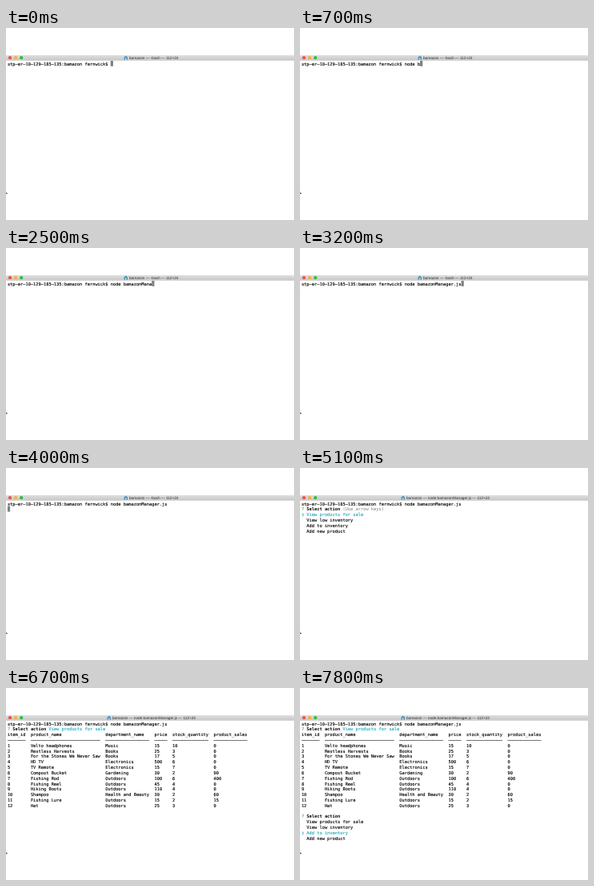
These frames come from a looping animation (360 by 240 pixels, 8000 ms). An HTML page with a canvas:

```html
<!DOCTYPE html>
<html lang="en">
<head>
<meta charset="utf-8">
<title>Terminal session</title>
<style>
html, body { margin: 0; width: 100%; height: 100%; overflow: hidden; background: #fff; }
canvas { display: block; }
</style>
</head>
<body>
<canvas id="stage" width="360" height="240"></canvas>
<script>
const ctx = document.getElementById('stage').getContext('2d');
ctx.textRendering = 'geometricPrecision';

const LOOP = 8000;
const LEFT = 1.9, TOP = 41, CELL = 3.22, ROW = 6.815, BASELINE = 5.55;
const MONO = '5.35px "DejaVu Sans Mono", monospace';
const BLACK = '#000', CYAN = '#1fa9bd', GREEN = '#2fae3a', GREY = '#999';

const PROMPT = 'stp-er-10-129-185-135:bamazon fernwick$ ';
const COMMAND = 'node bamazonManager.js ';
// One press time per character of the command
const KEYS = [100, 200, 300, 500, 700, 700, 900, 1100, 1300, 1500, 1600, 1700,
  2000, 2300, 2400, 2500, 2700, 2800, 2900, 3000, 3100, 3200, 3300];
const ENTER = 4000, RENAME = 4100, MENU = 4400, CHOOSE = 5700, TABLE = 5800;
const ERASE = 6700, DOWN1 = 6800, DOWN2 = 7100;

const ACTIONS = ['View products for sale', 'View low inventory', 'Add to inventory', 'Add new product'];
const COLUMNS = [0, 9, 38, 57, 64, 80];
const WIDTHS = [7, 27, 17, 5, 14, 13];
const PRODUCTS = `item_id|product_name|department_name|price|stock_quantity|product_sales
${WIDTHS.map(n => '-'.repeat(n)).join('|')}
1|Velto headphones|Music|15|10|0
2|Restless Harvests|Books|25|3|0
3|For the Stones We Never Saw|Books|17|5|0
4|HD TV|Electronics|500|6|0
5|TV Remote|Electronics|15|7|0
6|Compost Bucket|Gardening|30|2|90
7|Fishing Rod|Outdoors|100|6|400
8|Fishing Reel|Outdoors|45|4|0
9|Hiking Boots|Outdoors|110|4|0
10|Shampoo|Health and Beauty|30|2|60
11|Fishing Lure|Outdoors|15|2|15
12|Hat|Outdoors|25|3|0`.split('\n').map(line => line.split('|'));

// Writes text on the character grid; a hair stroke adds weight, hyphens are wide
function print(row, col, text, color = BLACK, bold = false) {
  ctx.font = (bold ? 'bold ' : '') + MONO;
  ctx.fillStyle = ctx.strokeStyle = color;
  ctx.lineWidth = 0.12;
  const y = TOP + row * ROW + BASELINE;
  [...text.replaceAll('-', '–')].forEach((ch, i) => {
    if (ch === ' ') return;
    const x = LEFT + (col + i) * CELL;
    ctx.fillText(ch, x, y);
    if (!bold) ctx.strokeText(ch, x, y);
  });
}

function cursor(row, col) {
  ctx.fillStyle = '#808080';
  ctx.fillRect(LEFT + col * CELL, TOP + row * ROW, CELL, ROW);
}

function titleBar(text, x) {
  const shade = ctx.createLinearGradient(0, 34, 0, 41);
  shade.addColorStop(0, '#dedede');
  shade.addColorStop(1, '#c6c6c6');
  ctx.fillStyle = shade;
  ctx.beginPath();
  ctx.roundRect(0, 34, 360, 6.8, [1.5, 1.5, 0, 0]);
  ctx.fill();

  ['#f2504b', '#f6b03a', '#2fbd43'].forEach((color, i) => {
    ctx.fillStyle = color;
    ctx.beginPath();
    ctx.arc(5 + i * 7.1, 37.2, 2.1, 0, 7);
    ctx.fill();
  });

  // Home folder icon
  ctx.fillStyle = '#4795c0';
  ctx.beginPath();
  [[-7, 37.2], [-4.2, 34.6], [-1.4, 37.2], [-2, 37.2], [-2, 39.8], [-6.4, 39.8], [-6.4, 37.2]]
    .forEach(([dx, y]) => ctx.lineTo(x + dx, y));
  ctx.fill();
  ctx.fillStyle = '#e8eef2';
  ctx.fillRect(x - 4.8, 37.4, 1.2, 2.4);

  ctx.font = '4.74px "Liberation Sans", Arial, sans-serif';
  ctx.fillStyle = '#2a2a2a';
  ctx.fillText(text, x, 39.1);
}

function question(row, note, color) {
  print(row, 0, '?', GREEN);
  print(row, 2, 'Select action', BLACK, true);
  print(row, 16, note, color);
}

function menu(row, selected, hint) {
  question(row, hint ? '(Use arrow keys)' : '', GREY);
  ACTIONS.forEach((action, i) => {
    const on = i === selected;
    if (on) print(row + 1 + i, 0, '❯', CYAN);
    print(row + 1 + i, 2, action, on ? CYAN : BLACK);
  });
}

function draw(t) {
  ctx.fillStyle = '#fff';
  ctx.fillRect(0, 0, 360, 240);
  ctx.fillStyle = BLACK;
  ctx.fillRect(0, 206, 1.5, 1);

  if (t < RENAME) titleBar('bamazon — -bash — 112×24', 154);
  else titleBar('bamazon — node bamazonManager.js — 112×24', 133);

  const typed = KEYS.filter(key => key <= t).length;
  print(0, 0, PROMPT + COMMAND.slice(0, typed));

  if (t < ENTER) cursor(0, PROMPT.length + typed);
  else if (t < MENU) cursor(1, 0);
  else if (t < CHOOSE) menu(1, 0, true);
  else question(1, ACTIONS[0], CYAN);

  if (t < TABLE) return;
  PRODUCTS.forEach((cells, i) => cells.forEach((cell, j) => print(2 + i, COLUMNS[j], cell)));
  if (t < ERASE) menu(17, 0, true);
  else if (t >= DOWN1) menu(17, t < DOWN2 ? 1 : 2, false);
}

const start = performance.now();
function frame() {
  draw((performance.now() - start) % LOOP);
  requestAnimationFrame(frame);
}
frame();
</script>
</body>
</html>
```
